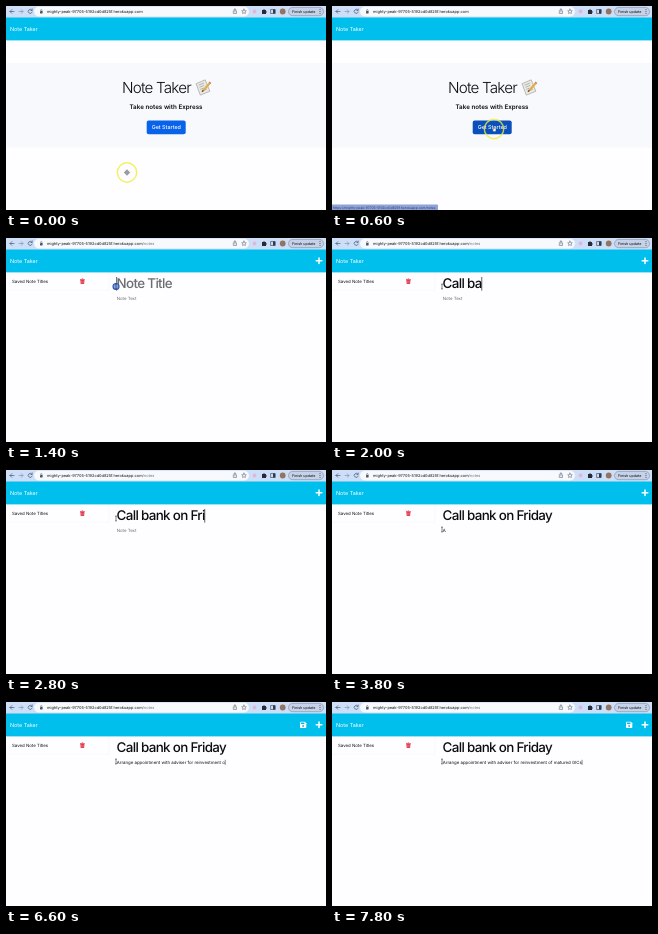
An HTML page for the animation above (8000 ms loop, 320x204 px).

```html
<!DOCTYPE html>
<html lang="en">
<head>
<meta charset="utf-8">
<title>Note Taker</title>
<style>
  html, body { margin: 0; width: 100%; height: 100%; overflow: hidden; background: #fefdff; }
  svg { display: block; width: 100%; height: 100%; }
  text { font-family: Inter, Roboto, sans-serif; white-space: pre; text-rendering: geometricPrecision; fill: #0c0d10; }
  .middle { text-anchor: middle; }
  .icon { fill: none; stroke: #4a5568; stroke-width: .7; stroke-linecap: round; stroke-linejoin: round; }
  .title { font-size: 13.4px; font-weight: 500; letter-spacing: -.05em; }
  .small { font-size: 4.35px; }
  .hint { fill: #6c6d72; }
</style>
</head>
<body>
<svg viewBox="0 0 320 204" preserveAspectRatio="none">
  <g id="browser">
    <rect width="320" height="12" fill="#cddff8"/>
    <rect x="28" y=".8" width="215" height="9.6" rx="4.8" fill="#f7f9fd"/>
    <g class="icon">
      <path d="M8 5.5H4M5.8 3.7 4 5.5l1.8 1.8"/>
      <path d="M13 5.5h4M15.2 3.7 17 5.5l-1.8 1.8" stroke="#8495ae"/>
      <path d="M26 4.4a2 2 0 1 0 .1 1.8M26.2 3v1.4h-1.4"/>
      <path d="M227.9 4.7h-.6v2.8h3.2V4.7h-.6M228.9 6V2.9M228 3.7l.9-.9.9.9" stroke-width=".5"/>
      <path d="M238 3.1l.7 1.5 1.6.2-1.2 1.1.3 1.7-1.4-.9-1.4.9.3-1.7-1.2-1.1 1.6-.2z" stroke-width=".5"/>
      <path d="M265 3.5h4.2v4H265z"/>
    </g>
    <rect x="267" y="3.5" width="2.2" height="4" fill="#2f3947"/>
    <path d="M256 4h1.2a.8.8 0 0 1 1.6 0h1.2v1.2a.8.8 0 0 1 0 1.6V8h-4z" fill="#252c38"/>
    <rect x="34" y="5" width="2.6" height="2.4" rx=".4" fill="#4a5568"/>
    <path d="M34.6 5v-.8a.7.7 0 0 1 1.4 0V5" fill="none" stroke="#4a5568" stroke-width=".5"/>
    <circle cx="248.5" cy="5.5" r="1.9" fill="#dfb9d3"/>
    <circle cx="276.7" cy="5.5" r="2.9" fill="#94745f"/>
    <rect x="282.5" y="1.4" width="35" height="8.3" rx="4.15" fill="#c6d2e8" stroke="#7f8aa0" stroke-width=".6"/>
    <text x="286" y="7" font-size="3.7">Finish update</text>
    <path d="M314 3.6v4" stroke="#333" stroke-width=".9" stroke-linecap="round" stroke-dasharray="0 1.9"/>
    <text x="41" y="6.9" font-size="3.95">mighty-peak-97705-5192cd0d825f.herokuapp.com<tspan id="route" fill="#6f747c">/notes</tspan></text>
  </g>

  <rect y="11.5" width="320" height="22.9" fill="#00bfec"/>
  <text x="4" y="24.8" font-size="5.4" style="fill:#fff">Note Taker</text>

  <g id="home">
    <rect y="57" width="320" height="84.5" fill="#f8f9fc"/>
    <text x="116" y="86.8" font-size="15.2" font-weight="350" letter-spacing="-.8">Note Taker</text>
    <g transform="translate(189 73) scale(1.06)">
      <path d="M1 4.4 9.6.8 14 11.6 5 15.2z" fill="#ece9e4" stroke="#aaa59e" stroke-width=".7"/>
      <path d="M3.4 5.8l5-2M4.2 7.8l4.4-1.8M5 9.8l3-1.2M5.8 11.8l5.4-2.2" stroke="#8b95a3" stroke-width=".6"/>
      <path d="M13.6 4.2 7.8 10.8" stroke="#dfae48" stroke-width="2"/>
      <path d="M14.6 3.1l-1 1.1" stroke="#cf7773" stroke-width="2.1"/>
      <path d="M7.1 10.1l1.5 1.3-2.2 1z" fill="#574639"/>
    </g>
    <text class="middle" x="160" y="103.2" font-size="6.25" font-weight="600">Take notes with Express</text>
    <rect id="button" x="140.7" y="114.6" width="39" height="13.6" rx="2"/>
    <text class="middle" x="160.3" y="123.4" font-size="5.4" font-weight="500" style="fill:#fff">Get Started</text>
    <g id="status">
      <path d="M0 198.5h105a1 1 0 0 1 1 1V204H0z" fill="#8fa3d6"/>
      <text x="1" y="202.6" font-size="3.35" style="fill:#2b3c78">https://mighty-peak-97705-5192cd0d825f.herokuapp.com/notes</text>
    </g>
  </g>

  <g id="notes">
    <path d="M0 52.3h103M103 35v17.3" fill="none" stroke="#f5f5f8" stroke-width=".6"/>
    <text class="small" x="6" y="45.3">Saved Note Titles</text>
    <g fill="#e23a4e">
      <path d="M74.3 42h4.2l-.4 4h-3.4z"/>
      <path d="M74 41h1.5l.4-.5h1l.4.5h1.5v.8H74z"/>
    </g>
    <path d="M75.7 42.8v2.5M77.1 42.8v2.5" stroke="#f3b3ba" stroke-width=".4"/>
    <path d="M313 20v5.6M310.2 22.8h5.6" stroke="#fff" stroke-width="1.5" stroke-linecap="round"/>
    <g id="save">
      <path d="M294 20.4q0-.7.7-.7h4.1l1.5 1.5v4q0 .7-.7.7h-4.9q-.7 0-.7-.7z" fill="#fff"/>
      <rect x="295" y="20.5" width="3.4" height="1.5" fill="#00bfec"/>
      <circle cx="297.1" cy="24" r=".9" fill="#00bfec"/>
    </g>
    <text id="title" class="title" x="110.6" y="50.4"></text>
    <text id="body" class="small" x="110.7" y="62"></text>
    <rect id="caret" fill="#222"/>
  </g>

  <g id="pointer">
    <circle id="ring" r="9.7" fill="none" stroke="#f4ec3a" stroke-opacity=".8" stroke-width="1.4"/>
    <circle id="press" r="3" fill="#7f9fe0" stroke="#2f57b5" stroke-width="1.1"/>
    <path id="arrow" d="M0-3.2 3.2 0 0 3.2-3.2 0z" fill="#9b9ca3"/>
    <path id="hand" d="M-.6-2q.5-.5.8 0v1.5l1.6.5q.3.2.2.8l-.4 1.6h-2L-1.7.8q.2-.7 1.1-.2z" fill="#fff" stroke="#333" stroke-width=".3"/>
    <path id="beam" d="M-1-2.6q1 0 1 .7v3.8q0 .7-1 .7M1-2.6q-1 0-1 .7m0 3.8q0 .7 1 .7" fill="none" stroke="#333" stroke-width=".6"/>
  </g>
</svg>
<script>
const LOOP = 8000, STEP = 200;
const TITLE = "Call bank on Friday";
const BODY = "Arrange appointment with adviser for reinvestment of matured GICs";

// time, x, y
const route = [[0, 121, 166.5], [200, 124, 163], [600, 162, 123], [800, 162, 123],
  [1000, 140, 92], [1200, 113, 52], [1400, 110, 48.5], [3200, 110, 48.5], [3600, 110, 59.5]];
// time, characters
const titleKeys = [[1400, 0], [2800, 16], [3200, 19]];
const bodyKeys = [[3600, 0], [3800, 1], [5200, 24], [7200, 62], [7400, 65]];

const el = id => document.getElementById(id);
const show = (id, on) => el(id).setAttribute("visibility", on ? "inherit" : "hidden");
const set = (id, attrs) => Object.entries(attrs).forEach(([k, v]) => el(id).setAttribute(k, v));

function sample(keys, t, column = 1) {
  if (t <= keys[0][0]) return keys[0][column];
  const next = keys.findIndex(k => k[0] > t);
  if (next < 0) return keys[keys.length - 1][column];
  const a = keys[next - 1], b = keys[next];
  return a[column] + (b[column] - a[column]) * (t - a[0]) / (b[0] - a[0]);
}

function write(id, text, count, hint) {
  el(id).textContent = count ? text.slice(0, count) : hint;
  el(id).classList.toggle("hint", !count);
  return count ? el(id).getComputedTextLength() : 0;
}

function draw(t) {
  const onNotes = t >= 1000, hovering = t >= 600 && !onNotes, inBody = t >= 3600;
  show("home", !onNotes);
  show("notes", onNotes);
  show("route", onNotes);
  show("status", hovering);
  show("save", t >= 4000);
  set("button", { fill: hovering ? "#0a50bb" : "#0862ea" });

  const titleWidth = write("title", TITLE, Math.round(sample(titleKeys, t)), "Note Title");
  const bodyWidth = write("body", BODY, Math.round(sample(bodyKeys, t)), "Note Text");
  set("caret", inBody
    ? { x: 110.7 + bodyWidth, y: 57.8, width: .5, height: 5.2 }
    : { x: 110.4 + titleWidth, y: 39, width: .7, height: 13.6 });
  show("caret", t >= 1400 && t !== 3800);

  set("pointer", { transform: `translate(${sample(route, t)} ${sample(route, t, 2)})` });
  show("ring", t < 1400);
  show("press", t === 800 || t === 1400 || t === 3600);
  show("hand", hovering);
  show("beam", t >= 1200);
  show("arrow", !hovering && t < 1200);
}

let last = -1;
function tick(now) {
  const t = Math.floor(now % LOOP / STEP) * STEP;
  if (t !== last) draw(last = t);
  requestAnimationFrame(tick);
}
draw(0);
requestAnimationFrame(tick);
</script>
</body>
</html>
```
